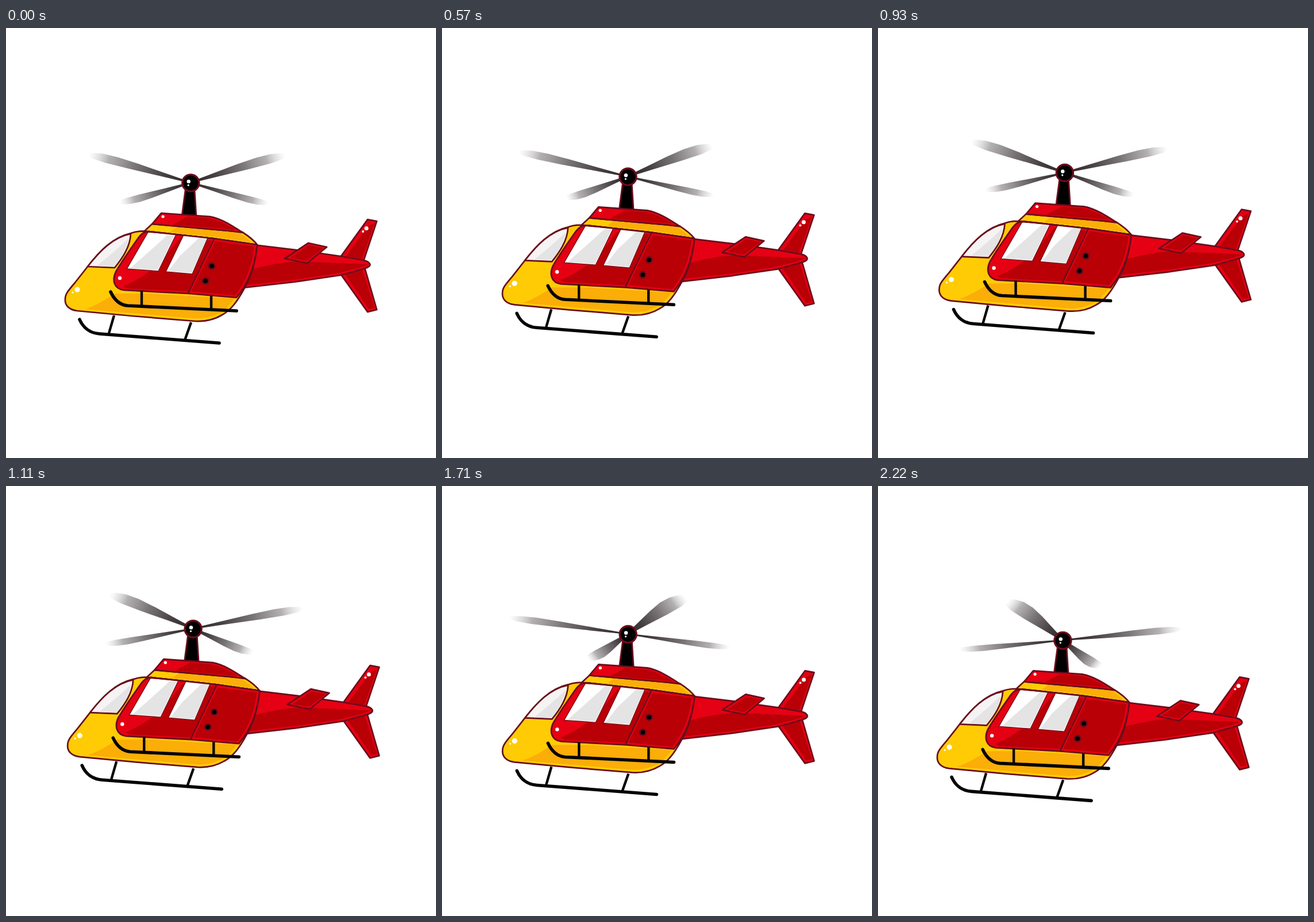
Recreate the animation shown at these times as an HTML page. Size 748x748 px, loop 2.25 s.

```html
<!DOCTYPE html>
<html lang="en">
<head>
<meta charset="utf-8">
<title>Helicopter</title>
<style>
html, body { margin: 0; width: 100%; height: 100%; overflow: hidden; background: #fff; }
svg { display: block; width: 100vw; height: 100vh; }
.line { stroke: #6a0d1c; stroke-width: 2.7; stroke-linejoin: round; stroke-linecap: round; }
.thin { stroke: #7d0a16; stroke-width: 1.5; stroke-linejoin: round; }
.none { fill: none; }
.red { fill: #e60013; }
.dark { fill: #b90006; }
.yellow { fill: #ffcb05; }
.orange { fill: #fbad08; }
.grey { fill: #e4e4e4; }
.white { fill: #fff; }
.skid { fill: none; stroke: #050505; stroke-width: 5.6; stroke-linecap: round; stroke-linejoin: round; }
.strut { fill: none; stroke: #050505; stroke-width: 4.4; }
</style>
</head>
<body>
<svg viewBox="0 0 748 748" xmlns="http://www.w3.org/2000/svg">
  <defs>
    <linearGradient id="fade">
      <stop offset="0" stop-color="#2a2426"/>
      <stop offset=".25" stop-color="#463f42"/>
      <stop offset=".55" stop-color="#7a7577"/>
      <stop offset=".8" stop-color="#a09c9e" stop-opacity=".8"/>
      <stop offset="1" stop-color="#d0cecf" stop-opacity="0"/>
    </linearGradient>
  </defs>
  <g id="craft">
    <g id="rotor" transform="translate(321 269)"></g>

    <!-- mast and hub -->
    <path class="line" d="M312 282H328L330.8 326H306.2Z"/>
    <circle class="line" cx="321.3" cy="269.5" r="14.6" style="stroke-width:3.2"/>
    <circle class="white" cx="317.7" cy="267" r="3.2"/>
    <circle class="white" cx="317.2" cy="273.4" r="1.6"/>

    <!-- far skid -->
    <path class="strut" d="M188 500L179 531M322 512L311 543"/>
    <path class="skid" d="M128 507C134 521 146 531 163 532L371 548"/>

    <!-- tail fins -->
    <path class="line red" d="M629 333L645 336L622 405L582 398Z"/>
    <path class="dark" d="M630 345L641 339L619 402L591 397Z"/>
    <path class="line red" d="M582 428L629 494L645 490L624 417Z"/>
    <path class="dark" d="M590 428L631 489L641 487L620 420Z"/>
    <circle class="white" cx="627" cy="348.5" r="3.5"/>
    <circle class="white" cx="621" cy="354" r="1.9"/>

    <!-- tail boom -->
    <path class="line red" d="M430 377L505 386L582 397L622 404C631 406 634 410 633 413C631 417 622 419 611 422L582 430L500 442L412 452Z"/>
    <path class="dark" d="M425 420C455 413 475 408 505 406L629 411C622 416 610 418 580 426L500 438L418 447Z"/>
    <path class="line red" d="M526 374L558 381L524 409L485 401Z"/>
    <path class="dark" d="M527 378L552 383L523 405L494 400Z"/>

    <!-- roof -->
    <path class="line yellow" d="M240 354L254 341L411 355C422 362 431 369 437 377L360 366Z"/>
    <path class="orange" d="M285 355L296 347L388 355L408 358C416 363 422 368 427 373L362 363Z"/>
    <path class="line red" d="M254 341L270 322L355 328C376 332 395 345 412 356L388 353Z"/>
    <path class="dark" d="M290 342L316 328L354 331C371 335 386 343 399 351L386 350Z"/>
    <circle class="white" cx="273" cy="328" r="2.6"/>

    <!-- cabin -->
    <path class="line yellow" d="M437 377C434 405 428 432 414 454C402 476 391 491 376 499C361 508 347 511 329 510L220 501L124 492C108 490 102 481 103 471C103 463 108 457 120 443L142 415C163 388 186 364 217 357C228 353 236 353 249 354L360 366Z"/>
    <path class="orange" d="M138 489C158 482 174 472 189 462L250 462L397 471C386 487 376 495 364 499C352 504 340 506 326 505L220 496Z"/>
    <circle class="white" cx="124" cy="455" r="4.6"/>
    <circle class="white" cx="116" cy="460" r="1.6"/>

    <!-- windscreen -->
    <path class="line" fill="#f5f3f3" d="M142 415C163 388 186 364 217 358C216 381 202 401 189 417Z"/>
    <path class="grey" d="M158 414C177 398 196 383 213 366C211 384 199 401 188 415Z"/>

    <!-- side panel -->
    <path class="line red" d="M249 354L360 366L437 377C433 411 424 441 401 469L318 462L205 456C188 454 184 439 191 424C198 412 214 388 231 364C236 358 240 354 249 354Z"/>
    <path class="dark" d="M204 449C222 442 238 432 253 421L266 424L277 397L304 364L358 370L317 458L210 453Z"/>
    <path class="dark" d="M364 371L432 380C428 411 419 440 398 465L322 458Z"/>
    <path class="line none" d="M362 367L317 461"/>

    <!-- side windows -->
    <path class="thin white" d="M247 355L296 359L265 423L210 419Z"/>
    <path class="grey" d="M216 418L250 388L281 360L293 361L264 421Z"/>
    <path class="thin white" d="M309 360L351 365L324 428L278 424Z"/>
    <path class="grey" d="M282 423L303 396L336 365L349 367L323 426Z"/>
    <path class="line none" d="M240 354.5L249 354L360 366"/>

    <g class="line">
      <circle cx="358" cy="414" r="5.2"/>
      <circle cx="347" cy="440" r="5.2"/>
    </g>
    <circle class="white" cx="198" cy="435" r="3.2"/>

    <!-- near skid -->
    <path class="strut" d="M236 457V484M357 466V490"/>
    <path class="skid" d="M182 459C188 472 198 482 212 483L401 492"/>
  </g>
</svg>
<script>
const NS = "http://www.w3.org/2000/svg";
const STEP = 30, STEPS = 75, PEAK = 40;   // rises for 40 steps, sinks for 35
const RISE = 22.5, DRIFT = 4.6;
const TURNS = 6, PHASE = 48;
const R = 208, TILT = 0.293, DEPTH = 0.2, LEAN = 0.018;
const PROFILE = [[.06, 4], [.3, 9], [.6, 15.5], [.8, 18], [.92, 15], [.98, 8], [1, 0]];
const rad = Math.PI / 180;
const craft = document.getElementById("craft");
const rotor = document.getElementById("rotor");

function make(tag, attrs, parent) {
  const el = document.createElementNS(NS, tag);
  for (const key in attrs) el.setAttribute(key, attrs[key]);
  return parent.appendChild(el);
}

const blades = [0, 90, 180, 270].map((angle, i) => ({
  angle,
  grad: make("linearGradient", { id: "g" + i, href: "#fade", gradientUnits: "userSpaceOnUse", x1: 0, y1: 0 }, rotor),
  path: make("path", { fill: `url(#g${i})` }, rotor)
}));

// Point on the rotor disc, seen from slightly below
function project(r, side, a) {
  const x = r * Math.cos(a) - side * Math.sin(a);
  const y = r * Math.sin(a) + side * Math.cos(a);
  const q = 1 - DEPTH * y / R;
  return [x / q, -TILT * y / q + LEAN * x / q];
}

function drawBlade(blade, spin) {
  const deg = spin + blade.angle;
  const a = (deg + 2.2 * Math.sin(4 * (45 - deg) * rad)) * rad;
  const edge = sign => PROFILE.map(([u, h]) => project(u * R, sign * h, a));
  const points = [...edge(1), ...edge(-1).reverse()];
  blade.path.setAttribute("d", "M" + points.map(p => p.map(v => v.toFixed(2)).join(" ")).join("L") + "Z");
  const [x, y] = project(R, 0, a);
  blade.grad.setAttribute("x2", x);
  blade.grad.setAttribute("y2", y);
}

function draw(ms) {
  const n = Math.floor(ms / STEP) % STEPS;
  const lift = n < PEAK ? n / PEAK : (STEPS - n) / (STEPS - PEAK);
  craft.setAttribute("transform", `translate(${DRIFT * lift} ${-RISE * lift})`);
  const spin = PHASE + 360 * TURNS * n / STEPS;
  blades.forEach(b => drawBlade(b, spin));
}

const start = performance.now();
function tick() {
  draw(performance.now() - start);
  requestAnimationFrame(tick);
}
tick();
</script>
</body>
</html>
```
